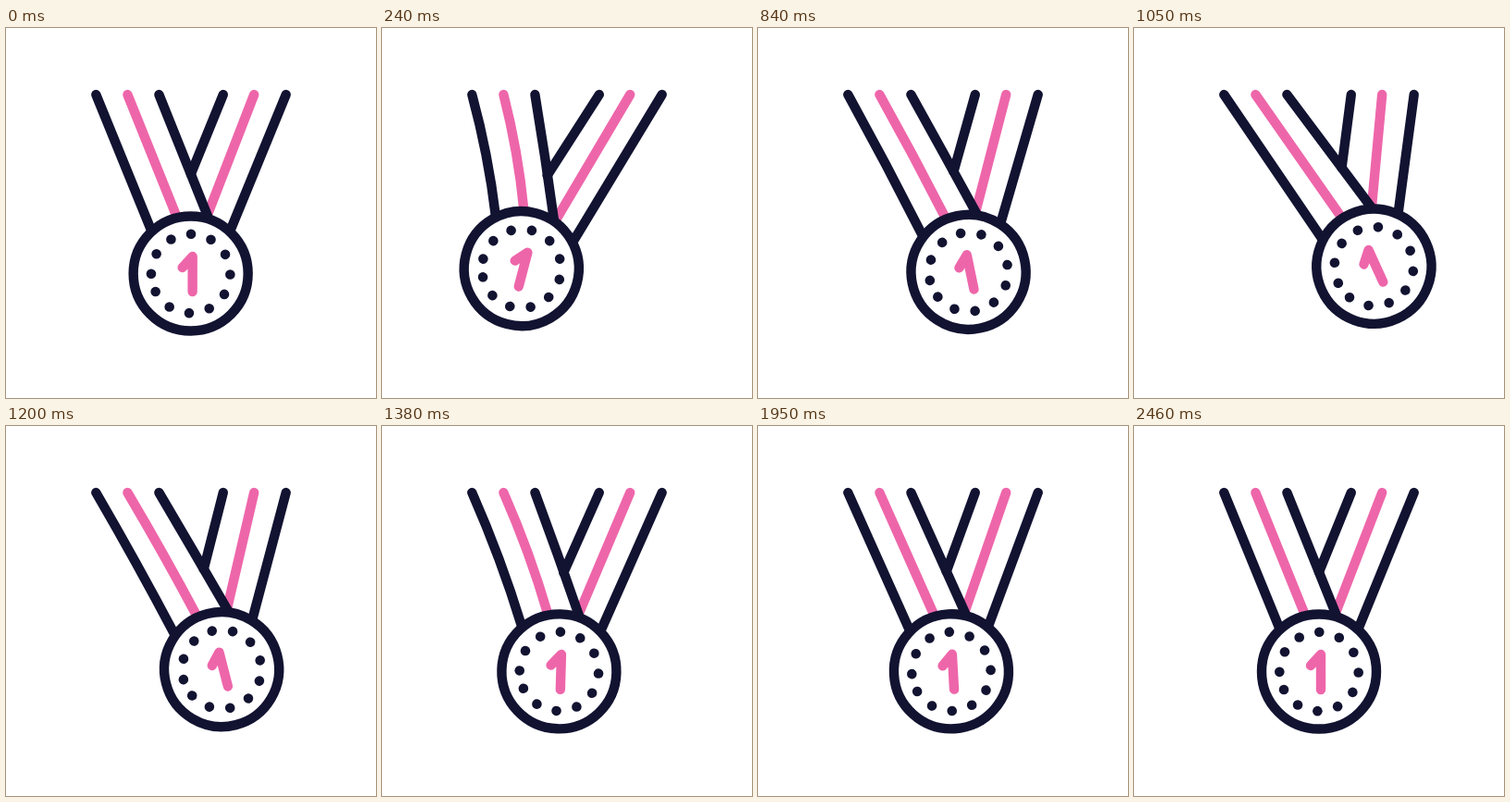
Recreate the animation shown at these times as an HTML page. Size 400x400 px, loop 3090 ms.

```html
<!DOCTYPE html>
<html lang="en">
<head>
<meta charset="utf-8">
<title>Swinging medal</title>
<style>
  html, body { margin: 0; width: 100%; height: 100%; overflow: hidden; background: #fff; }
  svg { display: block; width: 100%; height: 100%; }
  path, circle { fill: none; stroke: #121331; stroke-width: 10.4; stroke-linecap: round; stroke-linejoin: round; }
  .pink { stroke: #ee66aa; }
  .disc { fill: #fff; }
  .dot { fill: #121331; stroke: none; }
</style>
</head>
<body>
<svg viewBox="0 0 400 400">
  <path id="rightPink" class="pink"/>
  <path id="leftPink" class="pink"/>
  <path id="rightInner"/>
  <path id="rightOuter"/>
  <path id="leftOuter"/>
  <path id="leftInner"/>
  <g id="medal">
    <circle class="disc" r="62"/>
    <path class="pink" d="M-9-6.5 2-18.5V19.5"/>
  </g>
</svg>
<script>
const LOOP = 3090, TOP = 72, GRIP = 64, RAD = Math.PI / 180;
const times = [0, 600, 978, 1541, 2010, 2460];
const shift = [0, -59, 63, -25, 10.3, 0];
const tilt = [0, 23, -26, 8, -3.7, 0];
const slack = [0, 6, 0, 6, 0, 0];
const $ = id => document.getElementById(id);

const medal = $('medal');
for (let i = 0; i < 12; i++) {
  const a = (179.5 + i * 30.3) * RAD;
  const dot = document.createElementNS('http://www.w3.org/2000/svg', 'circle');
  dot.setAttribute('class', 'dot');
  dot.setAttribute('r', 5.3);
  dot.setAttribute('cx', 42.7 * Math.cos(a));
  dot.setAttribute('cy', 42.7 * Math.sin(a));
  medal.append(dot);
}

// The first swing is a push that dies out; the others ease both ways.
function sample(values, t, power) {
  if (t >= times[5]) return values[5];
  const i = times.findIndex(k => k > t) - 1;
  const u = (t - times[i]) / (times[i + 1] - times[i]);
  const e = i ? (1 - Math.cos(Math.PI * u)) / 2 : 1 - (1 - u) ** power;
  return values[i] + (values[i + 1] - values[i]) * e;
}

function strap(id, x, end, bend = 0) {
  const cx = (x + end[0]) / 2 + bend, cy = (TOP + end[1]) / 2;
  $(id).setAttribute('d', `M${x} ${TOP}Q${cx} ${cy} ${end[0]} ${end[1]}`);
}

function draw() {
  const t = performance.now() % LOOP;
  const dx = sample(shift, t, 3.5);
  const bend = sample(slack, t, 3.5);
  const x = 200 + dx, y = 265.5 - dx * dx / 450;
  const grip = deg => [x + GRIP * Math.sin(deg * RAD), y - GRIP * Math.cos(deg * RAD)];
  const left = -0.33 * dx;
  const right = -0.355 * dx + 0.0009 * dx * dx;

  const inner = grip(16.9 + left);
  strap('leftOuter', 97.3, grip(-42.2 + left), bend);
  strap('leftPink', 131.4, grip(-14 + left), bend);
  strap('leftInner', 165.4, inner, bend * 0.2);
  strap('rightOuter', 302.7, grip(42.2 + right));
  strap('rightPink', 268.2, grip(15.7 + right));
  strap('rightInner', 234.8, [165.4 + (inner[0] - 165.4) * 0.65, TOP + (inner[1] - TOP) * 0.65]);
  medal.setAttribute('transform', `translate(${x} ${y}) rotate(${sample(tilt, t, 2)})`);
  requestAnimationFrame(draw);
}
draw();
</script>
</body>
</html>
```
